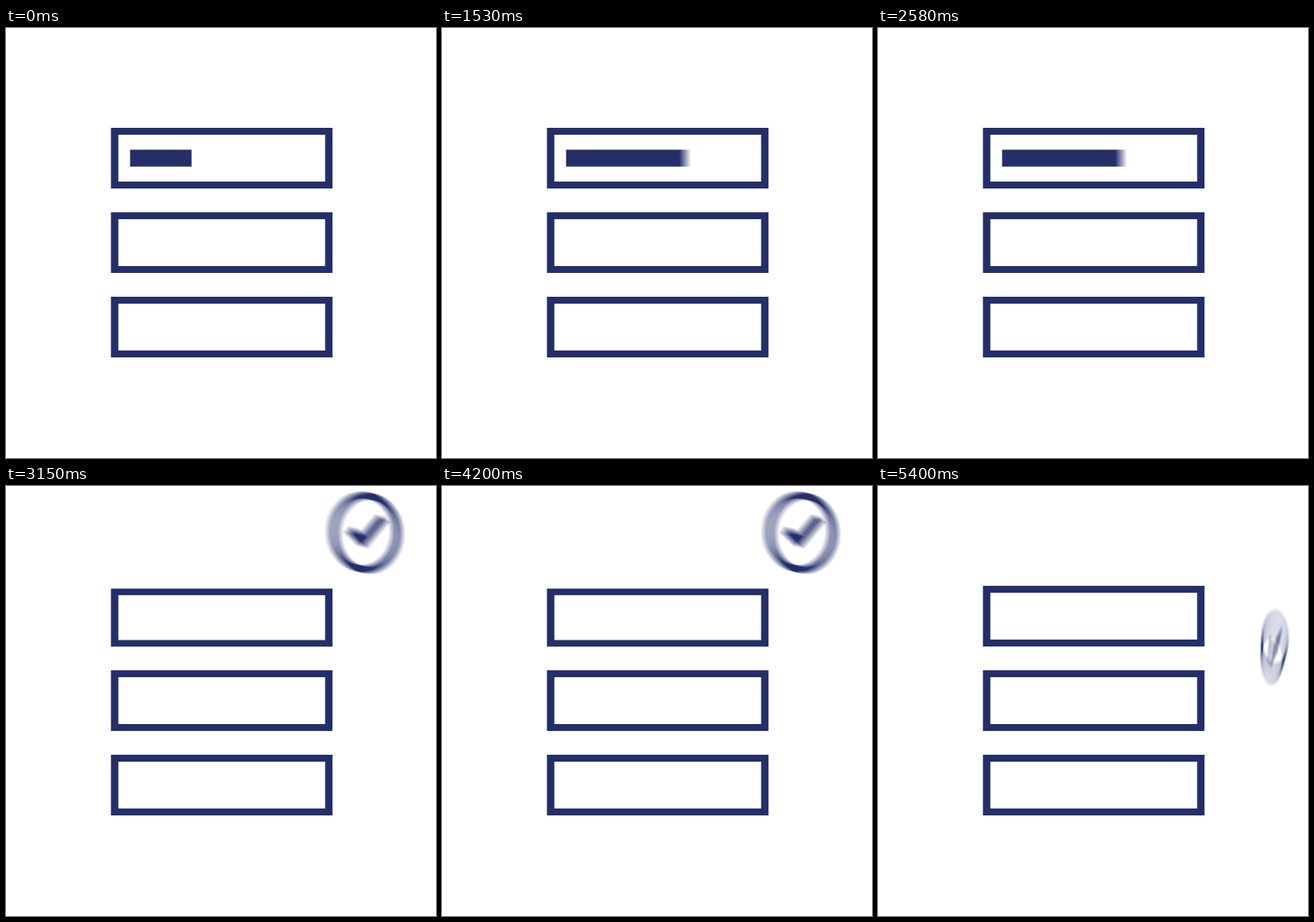
Animation of 560 by 560 pixels, one loop 5.43 s. Source, as an HTML page with a canvas:

```html
<!DOCTYPE html>
<html lang="en">
<head>
<meta charset="utf-8">
<title>Task list</title>
<style>
  html, body { margin: 0; width: 100%; height: 100%; overflow: hidden; background: #fff; }
  canvas { display: block; width: 560px; height: 560px; }
</style>
</head>
<body>
<canvas id="stage" width="560" height="560"></canvas>
<script>
const ctx = document.getElementById('stage').getContext('2d');
const NAVY = '#242f6a';
const LOOP = 5430, CYCLE = 1050, STEP = 30;
const START = 330;             // where a cycle wraps, just before the bar fills
const FIRST_LAG = 40;          // the opening cycle runs slightly late
const SHUTTER = 18, SAMPLES = 15;

const clamp = u => Math.min(1, Math.max(0, u));
const progress = (t, from, span) => clamp((t - from) / span);
const easeOut = u => Math.sin(u * Math.PI / 2);
const easeInOut = u => u * u * (3 - 2 * u);
// Rises from 0 to 1 and falls back within the span.
const bell = (t, from, span) => Math.sin(Math.PI * progress(t, from, span)) ** 2;

function drawBox(top, height) {
  const edge = 9 * height / 79;
  ctx.beginPath();
  ctx.rect(136.7, top, 288.5, height);
  ctx.rect(146.3, top + edge, 269.3, height - 2 * edge);
  ctx.fill('evenodd');
}

// A hit from below travels up the stack; the top box also recoils and squashes.
function drawBoxes(q) {
  for (let i = 0; i < 3; i++) {
    const lift = 16 * bell(q, 1270 + 20 * (2 - i), 60);
    const dip = i ? 0 : 26 * bell(q, 920, 130);
    const squash = i ? 0 : 3.5 * bell(q, 1000, 100);
    drawBox(130 + i * 110 - lift + dip + squash, 79 - squash);
  }
}

function drawBar(q, first) {
  const end = first
    ? 80 + 160 * easeInOut(progress(q, -FIRST_LAG, 705))
    : 240 * easeOut(progress(q, START, 335));
  const begin = 240 * easeInOut(progress(q, 740, 160));
  if (end > begin) ctx.fillRect(161.6 + begin, 158.5, end - begin, 22);
}

// The check is thrown on a parabola while it spins, then shrinks as it drops.
function drawDisc(q) {
  if (q < 905 || q > 1300) return;
  const size = 1 - ((q - 1050) / (q < 1050 ? 145 : 265)) ** 2;
  ctx.save();
  ctx.translate(520 - 0.0039 * (q - 1165) ** 2, 58.4 + 0.0053 * (q - 1030) ** 2);
  ctx.scale(size * Math.cos((q - 900) * 0.00357), size);
  ctx.lineWidth = 9;
  ctx.beginPath();
  ctx.arc(0, 0, 48, 0, Math.PI * 2);
  ctx.stroke();
  ctx.lineWidth = 11.5;
  ctx.beginPath();
  ctx.moveTo(-22, -3);
  ctx.lineTo(-4.5, 12);
  ctx.lineTo(26, -19);
  ctx.stroke();
  ctx.restore();
}

function drawScene(t, first) {
  const q = first ? t - FIRST_LAG : START + (t - START) % CYCLE;
  drawBoxes(q);
  drawBar(q, first);
  ctx.save();
  if (first) ctx.translate(-7, 13);   // the opening throw is lower
  drawDisc(first ? t : q);
  ctx.restore();
}

// Average several moments for motion blur, then tint the result.
function render(time) {
  const first = time < CYCLE + STEP;
  ctx.globalCompositeOperation = 'source-over';
  ctx.clearRect(0, 0, 560, 560);
  ctx.globalCompositeOperation = 'lighter';
  ctx.globalAlpha = 1 / SAMPLES + 0.0005;
  ctx.fillStyle = ctx.strokeStyle = '#000';
  for (let i = 0; i < SAMPLES; i++) {
    drawScene(time + SHUTTER * ((i + 0.5) / SAMPLES - 0.5), first);
  }
  ctx.globalCompositeOperation = 'source-in';
  ctx.globalAlpha = 1;
  ctx.fillStyle = NAVY;
  ctx.fillRect(0, 0, 560, 560);
}

const begin = performance.now();
let shown = -1;
function tick() {
  const elapsed = (performance.now() - begin) % LOOP;
  const time = Math.floor(elapsed / STEP) * STEP;
  if (time !== shown) render(shown = time);
  requestAnimationFrame(tick);
}
tick();
</script>
</body>
</html>
```
